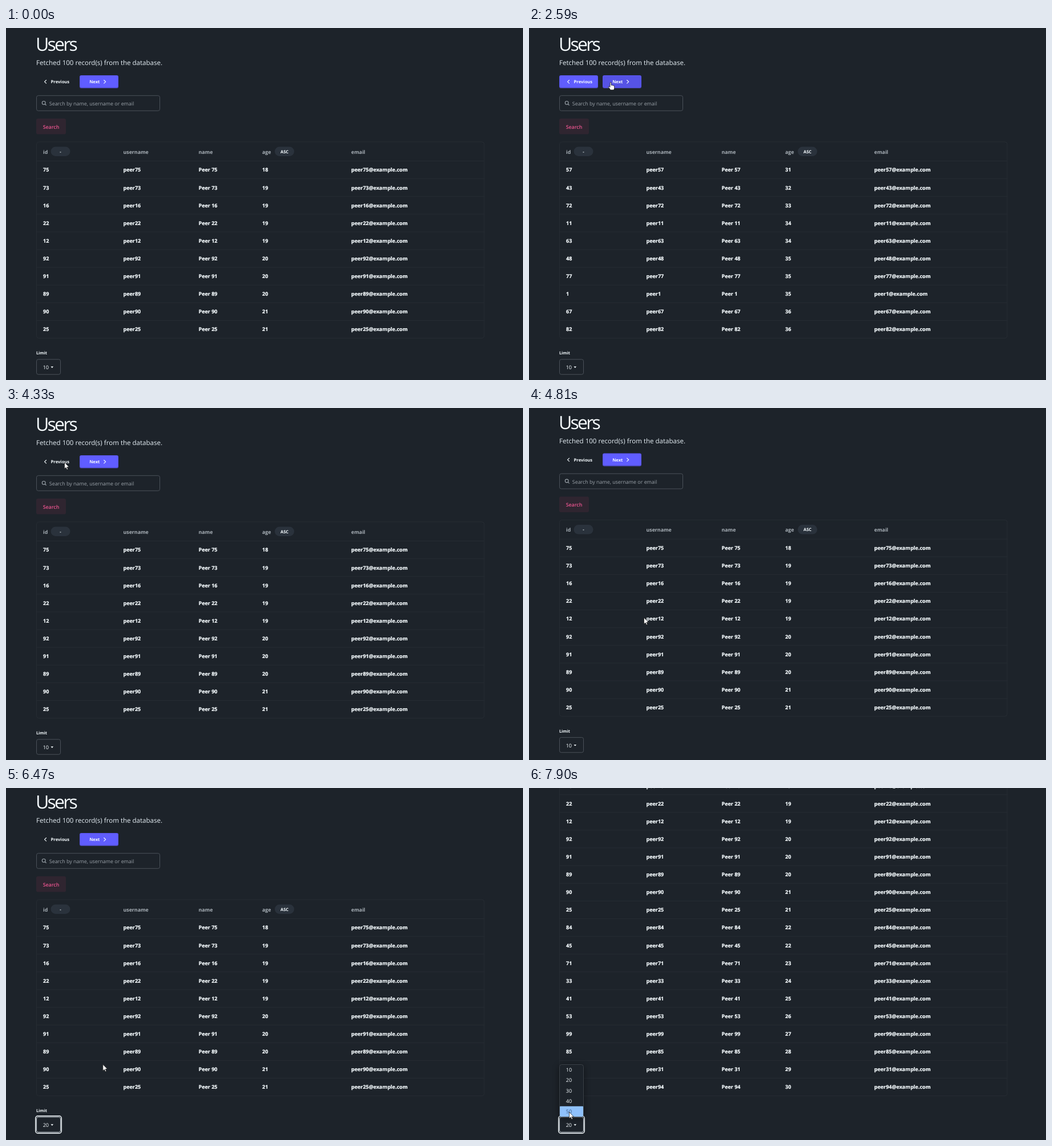
An HTML page for the animation above (8 s loop, 906 by 618 pixels).

```html
<!DOCTYPE html>
<html lang="en">
<head>
<meta charset="utf-8">
<title>Users</title>
<style>
html, body { margin: 0; width: 100%; height: 100%; overflow: hidden; background: #1d232a; }
svg { display: block; }
text { font: 9px "Open Sans", "Noto Sans", sans-serif; fill: #f6fcff; text-rendering: geometricPrecision; white-space: pre; }
.title { font-size: 32px; letter-spacing: -2.75px; }
.lead { font-size: 11.55px; fill: #e6eff5; }
.btn { font-size: 7.6px; font-weight: 700; }
.hint { font-size: 8.9px; fill: #9aa2a9; }
.search { font-size: 8.8px; font-weight: 600; fill: #ec5590; text-anchor: middle; }
.head { font-size: 8.8px; font-weight: 700; fill: #a8b0b7; }
.badge { font-size: 7.5px; font-weight: 700; text-anchor: middle; }
.cell { font-weight: 700; stroke: #f6fcff; stroke-width: .22px; }
.label { font-size: 7.3px; font-weight: 700; }
.dark { fill: #3c5a80; }
.line { fill: none; stroke: #262c33; }
.field { fill: none; stroke: #4a5159; }
.icon { fill: none; stroke: #f6fcff; stroke-width: 1.1; stroke-linecap: round; stroke-linejoin: round; }
.lens { stroke: #9ba3aa; }
.popup { fill: #1d232a; stroke: #3a4047; filter: drop-shadow(0 2px 6px #0007); }
.cursor { fill: #fff; stroke: #111; stroke-width: .7; stroke-linejoin: round; }
</style>
</head>
<body>
<svg id="stage" width="906" height="618" viewBox="0 0 906 618"></svg>
<script>
const LOOP = 8000, ROW = 31.11;
const ids = ('75 73 16 22 12 92 91 89 90 25 84 45 71 33 41 53 99 85 31 94 ' +
  '57 43 72 11 63 48 77 1 67 82').split(' ');

// Pointer moves: start, end, x, y
const moves = [[390, 1010, 124, 99], [1010, 1290, 143, 95], [3070, 3350, 102.5, 95.5],
  [4330, 4810, 201.5, 368], [4810, 5080, 75, 589], [5430, 5780, 71, 511],
  [5990, 6400, 169.8, 485.3], [7150, 7500, 75, 589], [7630, 7860, 70.5, 569]];

const ramp = (t, a, b) => Math.max(0, Math.min(1, (t - a) / (b - a)));
const smooth = (t, a, b) => { const u = ramp(t, a, b); return u * u * (3 - 2 * u); };
const easeOut = (t, a, b) => 1 - (1 - ramp(t, a, b)) ** 3;
const within = (t, a, b) => t >= a && t < b;
const fade = (t, a, b) => ramp(t, a, a + 200) - ramp(t, b, b + 200);

const age = i => Math.floor(18.7 + .3 * i + 9 * smooth(i, 8, 25));
const scrollAt = t => 3.4 * easeOut(t, 4400, 4600) + .6 * easeOut(t, 5990, 6100) +
  10 * ROW * easeOut(t, 6800, 7030);
const pointerAt = t => moves.reduce(([x, y], [a, b, toX, toY]) => {
  const u = smooth(t, a, b);
  return [x + (toX - x) * u, y + (toY - y) * u];
}, [556, 594]);

const text = (x, y, cls, s) => `<text x="${x}" y="${y}" class="${cls}">${s}</text>`;
const rect = (x, y, w, h, r, attrs) =>
  `<rect x="${x}" y="${y}" width="${w}" height="${h}" rx="${r}" ${attrs}/>`;
const path = (d, attrs) => `<path d="${d}" ${attrs}/>`;

function button(x, hover, opacity) {
  const c = [96 - 10 * hover, 93 - 10 * hover, 255 - 25 * hover].map(Math.round);
  return `<g opacity="${opacity}">` + rect(x, 84, 68, 22, 3, 'fill="#3f3d90"') +
    rect(x, 83, 68, 22, 3, 'fill="#5855ea"') +
    rect(x + 1, 84, 66, 20, 2, `fill="rgb(${c})"`) + '</g>';
}

function table(first, count) {
  let out = rect(53.5, 200, 784.5, 33.5 + count * ROW, 4, 'class="line"');
  const columns = { id: 65, username: 205.5, name: 337.5, age: 449, email: 605 };
  for (const name in columns) out += text(columns[name], 220.5, 'head', name);
  for (const [x, s] of [[78.5, '-'], [471, 'ASC']])
    out += rect(x, 208.5, 34, 16.5, 8.2, 'fill="#2a323c"') + text(x + 17, 219.5, 'badge', s);
  for (let i = 0; i < count; i++) {
    const id = ids[first + i], y = i * ROW;
    const cells = [id, 'peer' + id, 'Peer ' + id, age(first + i), `peer${id}@example.com`];
    out += path(`M53.5 ${233.5 + y}H838`, 'class="line"');
    Object.values(columns).forEach((x, k) => out += text(x, 252.4 + y, 'cell', cells[k]));
  }
  return out;
}

function limitBox(limit, focus, dy) {
  return `<g transform="translate(0 ${dy})">` + text(53, 573, 'label', 'Limit') +
    (focus ? rect(51.8, 579.8, 45.4, 30.4, 4, 'fill="none" stroke="#f6fcff" stroke-width="1.5"') : '') +
    rect(53.5, 581.8, 42, 26.4, 3, `class="field" ${focus ? 'style="stroke:#c5ced5"' : ''}`) +
    text(64.7, 599, '', limit) + path('M78.5 594.3h4.6l-2.3 2.7z', 'fill="#f6fcff"') + '</g>';
}

function popup(limit, y) {
  const hovered = y < 577 ? Math.floor((y - 485.5) / 18.25) : limit / 10 - 1;
  let out = rect(53.5, 485.5, 42, 91.5, 4, 'class="popup"');
  for (let i = 0; i < 5; i++) {
    const top = 485.7 + i * 18.25, on = i === hovered;
    if (on) out += rect(54, top, 41, 18.2, 1, 'fill="#8fc1fb"');
    out += text(64.8, top + 12.4, on ? 'dark' : '', 10 * (i + 1));
  }
  return out;
}

function cursor(x, y, hand) {
  const d = hand
    ? 'M-1 1Q0-.6 1 1V5.5Q2 4.6 3 5.8Q4.2 5 5 6.3Q6.6 5.8 6.6 7.8V10.5Q6.4 12 5.5 13.8H-.3' +
      'Q-1 12-3.6 9Q-4.4 7.4-3 7.4L-1 9z'
    : 'M0 0V11.2L2.6 8.9 4.3 12.8 6.1 12 4.4 8.2H8z';
  return path(d, `class="cursor" transform="translate(${x} ${y})"`);
}

function draw(t) {
  const page = within(t, 2310, 3560) ? 2 : within(t, 1770, 4120) ? 1 : 0;
  const count = t < 6800 ? 10 : 20, limit = t < 5990 ? 10 : 20;
  const open = within(t, 5150, 5990) || t >= 7630;
  const focus = within(t, 5150, 6800) || t >= 7630;
  const [x, y] = pointerAt(t);

  return `<g transform="translate(0 ${-scrollAt(t)})">` +
    text(52, 40, 'title', 'Users') +
    text(53, 65, 'lead', 'Fetched 100 record(s) from the database.') +
    button(53, fade(t, 3200, 4380), fade(t, 1770, 4120)) +
    button(129, fade(t, 1010, 3140), 1) +
    path('M70.5 91.5l-3 2.8 3 2.8M171.7 91.5l3 2.8-3 2.8', 'class="icon"') +
    text(78.6, 97.4, 'btn', 'Previous') + text(146.2, 97.4, 'btn', 'Next') +
    rect(53.5, 118.7, 216, 26.6, 3, 'class="field"') +
    '<circle cx="66.2" cy="131.4" r="2.9" class="icon lens"/>' +
    path('M68.4 133.6l1.9 1.9', 'class="icon lens"') +
    text(75.8, 136, 'hint', 'Search by name, username or email') +
    rect(53, 159, 52, 27.5, 3, 'fill="#2f2530"') + text(79, 176.6, 'search', 'Search') +
    table(page * 10, count) + limitBox(limit, focus, (count - 10) * ROW) + '</g>' +
    (open ? popup(limit, y) : '') +
    (t >= 390 ? cursor(x, y, within(t, 1080, 3140)) : '');
}

const stage = document.getElementById('stage');
let shown = '';
function tick() {
  const next = draw(performance.now() % LOOP);
  if (next !== shown) stage.innerHTML = shown = next;
  requestAnimationFrame(tick);
}
tick();
</script>
</body>
</html>
```
